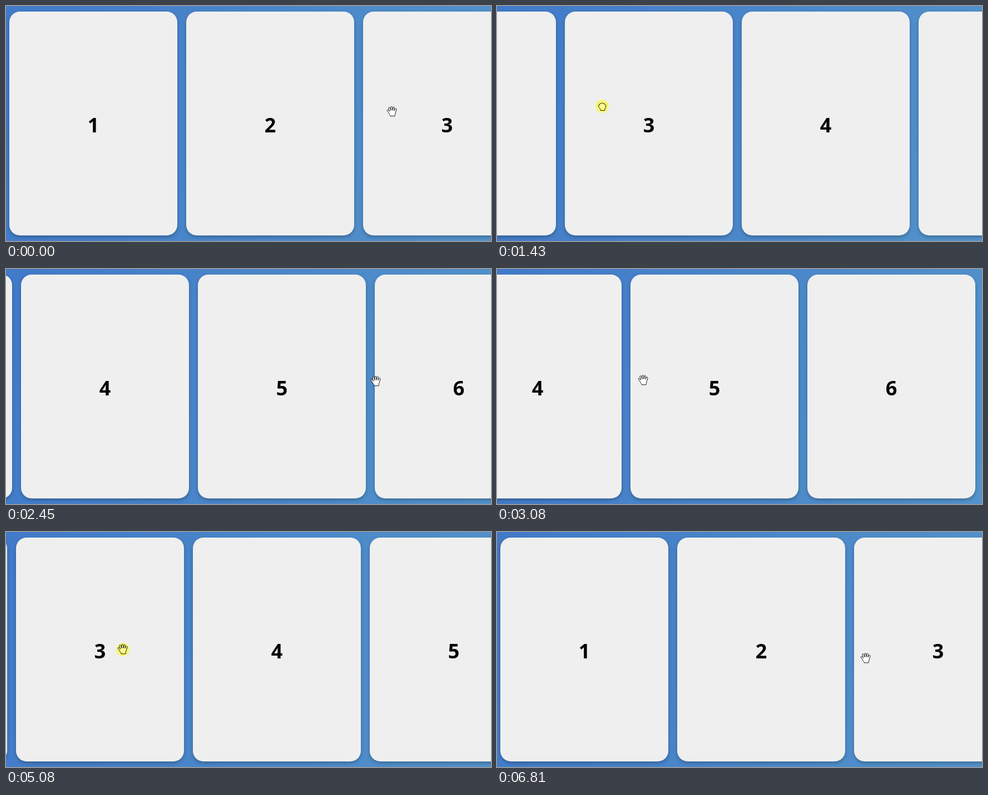
Recreate the animation shown at these times as an HTML page with a canvas. Size 872 px wide and 422 px high, loop 7260 ms.

```html
<!DOCTYPE html>
<html lang="en">
<head>
<meta charset="utf-8">
<title>Draggable carousel</title>
<style>
  html, body { margin: 0; width: 100%; height: 100%; overflow: hidden; }
  body { background: linear-gradient(105deg, #417ac9, #5393ca); }
  canvas { display: block; }
</style>
</head>
<body>
<canvas id="stage" width="872" height="422"></canvas>
<script>
const ctx = document.getElementById('stage').getContext('2d');
const LOOP = 7260;
const CARD = { x: 6, y: 10, w: 302, h: 402, pitch: 318, radius: 19, count: 6 };
const MAX_SCROLL = 1038;
const SCROLL_LAG = 26;   // the cards trail the pointer slightly
const PRESS_LEAD = 30;   // the button goes down just before a drag

// The pointer's journey: each step eases to (x, y); drags pull the cards along
const start = { x: 694, y: 190 };
const move = (from, to, x, y) => ({ from, to, x, y, drag: false });
const drag = (from, to, x, y) => ({ from, to, x, y, drag: true });
const steps = [
  move(190, 400, 713, 188),
  drag(430, 608, 713, 188),
  drag(608, 1458, 187, 180),
  move(1458, 1717, 700, 190),
  drag(1747, 2220, 293, 192),
  move(2222, 2520, 723, 203),
  drag(2690, 3070, 263, 200),
  move(3420, 4020, 169, 196),
  drag(4056, 4586, 583, 207),
  move(4586, 4930, 210, 211),
  drag(5090, 5620, 620, 216),
  move(5620, 5890, 250, 218),
  drag(5920, 6450, 589, 222),
  move(6530, 6640, 663, 227),
  drag(6640, 6810, 663, 227)
];

const openHand = new Path2D(`M-5 4C-6 1-8-1-9-2C-9.8-3.6-7.2-4.4-6-2.5L-4.5-.8L-6-6
  C-6.6-8.5-3.9-9-3.3-7L-2-2.5L-2-8C-2-9.9 .7-9.9 .8-8L1-2.7L2-7.6C2.4-9.4 4.8-9 4.5-7.2
  L3.8-2.2L5.4-5C6.2-6.6 8.5-5.9 8-4L6.5 .8C6 3 5.5 4 5 7.8L-3 7.8C-3 6-4 5-5 4Z`);
const closedHand = new Path2D(`M-4.2 3.8C-6 2-7.2 0-6.5-1.5C-6-2.4-5-2.2-4.8-1.6
  C-5.6-4.5-3-6-1.9-4.3C-1.3-6.5 1.6-6.4 1.8-4.3C2.8-5.9 4.9-5 4.6-3
  C6.4-3.6 7.2-2 6.8 .3C6.4 3 5 4 4.5 7.6L-2.8 7.6C-2.8 6-3.2 4.8-4.2 3.8Z`);

const clamp = (value, low, high) => Math.min(high, Math.max(low, value));
const mix = (a, b, amount) => a + (b - a) * amount;

function progress(step, t) {
  const u = clamp((t - step.from) / (step.to - step.from), 0, 1);
  return u * u * (3 - 2 * u);
}

function pointerAt(t) {
  let { x, y } = start;
  for (const step of steps) {
    const p = progress(step, t);
    x = mix(x, step.x, p);
    y = mix(y, step.y, p);
  }
  return { x, y };
}

function scrollAt(t) {
  let scroll = 0, fromX = start.x;
  for (const step of steps) {
    if (step.drag) {
      const pulled = (fromX - step.x) * progress(step, t - SCROLL_LAG);
      scroll = clamp(scroll + pulled, 0, MAX_SCROLL);
    }
    fromX = step.x;
  }
  return scroll;
}

function drawCard(index, scroll) {
  const x = CARD.x + index * CARD.pitch - scroll;
  ctx.save();
  ctx.shadowColor = 'rgba(0, 0, 0, .25)';
  ctx.shadowBlur = 6;
  ctx.shadowOffsetY = 3;
  ctx.fillStyle = '#efefef';
  ctx.beginPath();
  ctx.roundRect(x, CARD.y, CARD.w, CARD.h, CARD.radius);
  ctx.fill();
  ctx.restore();
  ctx.fillStyle = '#000';
  ctx.fillText(index + 1, x + CARD.w / 2, 226.5);
}

function drawPointer(t) {
  const during = lead => steps.some(s => s.drag && t >= s.from - lead && t < s.to);
  const pressed = during(PRESS_LEAD);
  const hand = during(0) ? closedHand : openHand;
  const { x, y } = pointerAt(t);
  ctx.save();
  ctx.translate(Math.round(x), Math.round(y));
  if (pressed) {
    ctx.fillStyle = '#f8f67a';
    ctx.beginPath();
    ctx.arc(0, 0, 12, 0, 2 * Math.PI);
    ctx.fill();
  }
  ctx.fillStyle = pressed ? '#fbfa8c' : '#fff';
  ctx.fill(hand);
  ctx.lineWidth = 0.9;
  ctx.lineJoin = 'round';
  ctx.strokeStyle = '#000';
  ctx.stroke(hand);
  ctx.restore();
}

function draw() {
  const t = performance.now() % LOOP;
  const scroll = Math.round(scrollAt(t));
  ctx.clearRect(0, 0, 872, 422);
  ctx.font = '700 36px "Open Sans", "Noto Sans", sans-serif';
  ctx.textAlign = 'center';
  for (let i = 0; i < CARD.count; i++) drawCard(i, scroll);
  drawPointer(t);
  requestAnimationFrame(draw);
}
draw();
</script>
</body>
</html>
```
